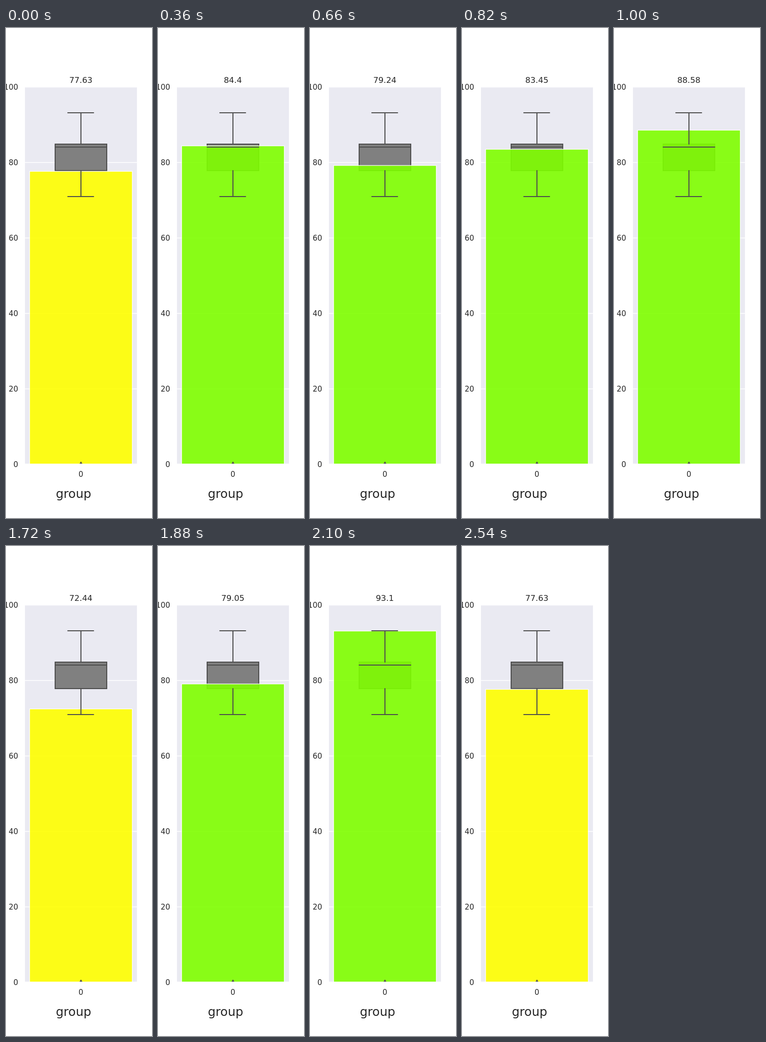
An HTML page for the animation above (2.56 s loop, 300 by 1000 pixels).

```html
<!DOCTYPE html>
<html lang="en">
<head>
<meta charset="utf-8">
<title>Bar over box plot</title>
<style>
  html, body { margin: 0; width: 100%; height: 100%; overflow: hidden; background: #fff; }
  svg { display: block; width: 300px; height: 1000px; }
  text { font: 15.28px "DejaVu Sans", sans-serif; fill: #262626; text-anchor: middle; }
  #ticks text { text-anchor: end; }
  #title { font-size: 16.67px; }
  #label { font-size: 25px; }
  .line { fill: none; stroke: #4d4d4d; stroke-width: 2.08; stroke-linecap: round; }
</style>
</head>
<body>
<svg viewBox="0 0 300 1000">
  <clipPath id="area"><rect x="38" y="120" width="232" height="770"/></clipPath>
  <rect x="38" y="120" width="232" height="770" fill="#eaeaf2"/>
  <g id="ticks"></g>
  <g clip-path="url(#area)">
    <rect class="line" x="101" y="237" width="106" height="54" style="fill:#808080"/>
    <rect id="bar" x="48.5" width="211" stroke="#fff" stroke-width="1.39" opacity=".9"/>
    <path class="line" d="M154 291V344M154 237V173M127 344H180M127 173H180M101 243H207"/>
    <path d="M154 885l3 5-3 5-3-5z" fill="#4d4d4d" stroke="#4d4d4d" stroke-width=".7"/>
  </g>
  <rect x="38" y="120" width="232" height="770" fill="none" stroke="#fff" stroke-width="1.74"/>
  <text id="title" x="153.75" y="112.3"></text>
  <text x="153.75" y="915.5">0</text>
  <text id="label" x="138.8" y="959">group</text>
</svg>
<script>
const get = id => document.getElementById(id);
const bar = get('bar'), title = get('title');
const TICK = 20, START = 40, HOLD = 5, LIMIT = 78;
const toY = v => 890 - 7.7 * v;

let ticks = '';
for (let v = 0; v <= 100; v += 20) {
  const y = toY(v);
  ticks += `<path d="M38 ${y + .5}H270" stroke="#fff" stroke-width="1.39"/>` +
           `<text x="24.9" y="${y + 5.6}">${v}</text>`;
}
get('ticks').innerHTML = ticks;

// Each value rests for HOLD ticks, then blends into the next one.
const values = [75.26, 84.2, 84.4, 77.87, 79.7, 84.7, 88.58, 84.85,
                82.68, 78.5, 70.9, 77.06, 85, 93.1, 84.1, 80];
const blends = { 7: [.5, .5], 15: [.25, .5, .5, .75] };
const steps = values.flatMap((v, i) => {
  const next = values[(i + 1) % values.length];
  const blend = blends[i] || [.25, .5, .75];
  return [...Array(HOLD).fill(v), ...blend.map(f => v + (next - v) * f)];
});

function draw(now) {
  const n = steps.length;
  const tick = Math.floor((now - START) / TICK);
  const value = steps[((tick % n) + n) % n];
  const y = Math.round(toY(value)) + .5;
  bar.setAttribute('y', y);
  bar.setAttribute('height', 890.5 - y);
  bar.setAttribute('fill', value < LIMIT ? '#ff0' : '#7fff00');
  title.textContent = +value.toFixed(2);
}

const begin = performance.now();
function loop() {
  draw(performance.now() - begin);
  requestAnimationFrame(loop);
}
loop();
</script>
</body>
</html>
```
